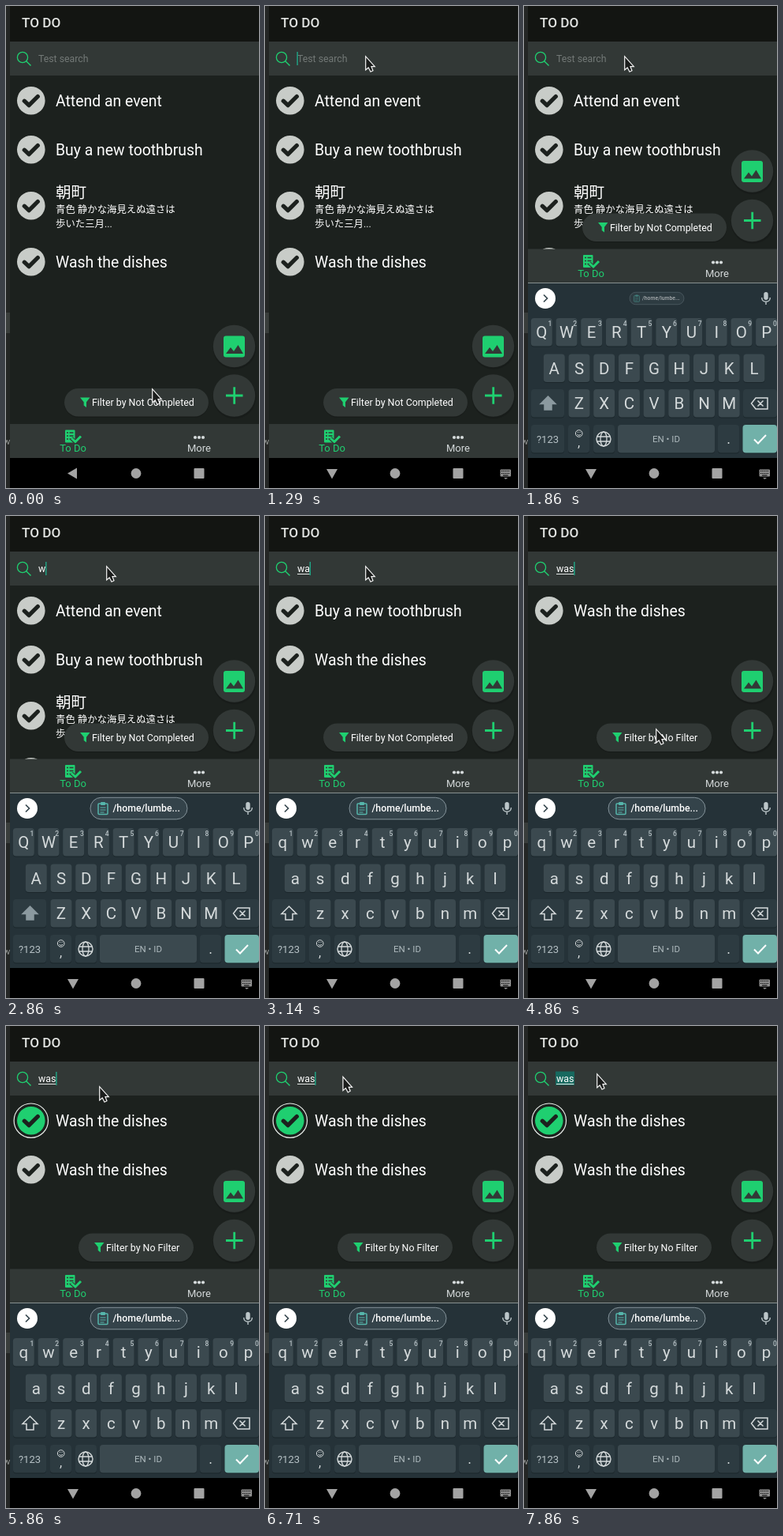
An HTML page for the animation above (8 s loop, 321 px wide and 610 px high).

```html
<!DOCTYPE html>
<html lang="en">
<head>
<meta charset="utf-8">
<style>
  html, body { margin: 0; height: 100%; overflow: hidden; background: #000; }
  svg { display: block; width: 100vw; height: 100vh; font-family: Roboto, "Noto Sans CJK JP", "Noto Sans CJK", sans-serif; }
  text { white-space: pre; }
</style>
</head>
<body>
<svg id="stage" viewBox="0 0 321 610"></svg>
<script>
const LOOP = 8000, FPS = 7;
const GREEN = '#1fcf70', PANEL = '#323836', BODY = '#1c211e', SOFT = '#d5dadb';
const stage = document.getElementById('stage');

const rect = (x, y, w, h, fill, rx = 0, more = '') =>
  `<rect x="${x}" y="${y}" width="${w}" height="${h}" rx="${rx}" fill="${fill}" ${more}/>`;
const circle = (x, y, r, fill, more = '') => `<circle cx="${x}" cy="${y}" r="${r}" fill="${fill}" ${more}/>`;
const text = (x, y, size, str, fill = '#fff', more = '') =>
  `<text x="${x}" y="${y}" font-size="${size}" fill="${fill}" ${more}>${str}</text>`;
const centered = (x, y, size, str, fill = SOFT, more = '') => text(x, y, size, str, fill, `text-anchor="middle" ${more}`);
const fillPath = (d, fill) => `<path d="${d}" fill="${fill}"/>`;
const line = (d, color, width = 1.5, more = '') =>
  `<path d="${d}" fill="none" stroke="${color}" stroke-width="${width}" ${more}/>`;
const group = (x, y, inner, more = '') => `<g transform="translate(${x} ${y}) ${more}">${inner}</g>`;

const wash = { title: 'Wash the dishes' };
const tasks = [
  { title: 'Attend an event' },
  { title: 'Buy a new toothbrush' },
  { title: '朝町', note: ['青色 静かな海見えぬ遠さは', '歩いた三月...'] },
  wash
];

// Pointer stops: step, x, y
const stops = [[1, 185, 484], [6, 127, 63], [27, 127, 63], [28, 167, 269],
  [36, 167, 269], [41, 118, 76], [43, 116, 74], [49, 92, 60]];

function pointerAt(n) {
  const i = stops.findIndex(s => s[0] >= n);
  if (i < 0) return stops.at(-1).slice(1);
  if (i === 0) return stops[0].slice(1);
  const [a, b] = [stops[i - 1], stops[i]];
  const u = (n - a[0]) / (b[0] - a[0]), k = u * u * (3 - 2 * u);
  return [a[1] + (b[1] - a[1]) * k, a[2] + (b[2] - a[2]) * k];
}

const typedAt = n => 'was'.slice(0, Math.max(0, Math.min(3, Math.floor((n - 17) / 2))));

function taskRow(task, y) {
  const badge = circle(0, 0, 17.8, task.done ? GREEN : '#c8ccc8') +
    line('M-8.5 .5L-2.7 6L8.5 -5.2', BODY, 5.3, 'stroke-linecap="round" stroke-linejoin="round"') +
    (task.done ? circle(0, 0, 21.7, 'none', 'stroke="#e8ece9" stroke-width="1.2"') : '');
  const label = task.note
    ? text(63, y - 10, 19.6, task.title) + task.note.map((s, i) => text(63, y + 8.5 + 18 * i, 12.4, s)).join('')
    : text(63, y + 7, 19.4, task.title);
  return group(31.8, y - .3, badge) + label;
}

function taskList(n) {
  const query = typedAt(n - 2);
  const shown = n >= 36 ? [{ ...wash, done: true }, wash]
    : tasks.filter(t => t.title.toLowerCase().includes(query));
  let y = 89;
  return shown.map(task => {
    const half = task.note ? 40 : 31;
    y += 2 * half;
    return taskRow(task, y - half);
  }).join('');
}

function searchBar(n) {
  const typed = typedAt(n), width = [0, 9.7, 16.2, 22.8][typed.length];
  const selected = n >= 52;
  const caret = n < 9 ? n === 8 : n < 19 ? n < 13 || n > 16
    : !selected && Math.floor((n - 25) / 3.5) % 2 !== 1;
  return rect(5, 45, 316, 43, PANEL) +
    circle(21, 65, 6.6, 'none', `stroke="${GREEN}" stroke-width="1.3"`) + line('M25.7 69.7L31.5 75.5', GREEN, 1.4) +
    (selected ? rect(40, 57.5, 24, 17.5, '#17695f') : '') +
    (typed ? text(41, 71, 12.4, typed) : text(41, 71, 12.3, 'Test search', '#737977')) +
    (n >= 21 ? rect(41, 73, width - .5, 1, '#e4e8e6') : '') +
    (caret ? rect(40.4 + width, 58, 1.4, 17, '#20a888') : '');
}

function floating(n) {
  const [label, x, w] = n < 31 ? ['Filter by Not Completed', 74, 183] : ['Filter by No Filter', 92, 146];
  const disc = y => circle(290, y + 2, 27.5, '#000', 'opacity=".14"') + circle(289.5, y, 26.7, PANEL);
  return disc(430.5) + rect(276, 417.5, 27, 27, GREEN, 3) + fillPath('M279 440L285 432L289 437L294.5 429L301 440Z', PANEL) +
    disc(493) + line('M279 493H300.5M289.7 482.3V503.7', GREEN, 2.8) +
    rect(x, 486, w, 35, '#000', 17.5, 'opacity=".14"') + rect(x, 484, w, 35.5, PANEL, 17.7) +
    group(x + 20, 495.5, fillPath('M0 0H12.5L8 5.7V12.5L4.7 10V5.7Z', GREEN)) +
    text(x + 35, 506, 12.4, label);
}

function tabBar() {
  return rect(5, 529, 316, 43, PANEL) +
    rect(75, 536.5, 12.5, 16, GREEN, 1) +
    line('M77 540H79M77 544H79M77 548H79M80.5 540H85.5M80.5 544H85.5M80.5 548H84', PANEL, 1.3) +
    line('M83 547L88 552L95 544.5', PANEL, 5) + line('M83 547L88 551.5L95 544.5', GREEN, 3) +
    centered(85, 564, 13, 'To Do', GREEN) +
    [240, 245, 250].map(x => circle(x, 546, 2.1, SOFT)).join('') + centered(245, 564, 13, 'More');
}

function chip(n) {
  const u = Math.min(1, (n - 13) / 3), scale = .56 + .44 * u;
  return `<g transform="translate(168.5 370) scale(${scale})" opacity="${.6 + .4 * u}">` +
    rect(-61.5, -13.7, 123, 27.5, '#34434a', 13.7, 'stroke="#84939a"') +
    rect(-51.5, -6, 12, 13.5, 'none', 1, 'stroke="#55b5ab" stroke-width="1.5"') + rect(-48.5, -8, 6, 4, '#55b5ab', 1) +
    line('M-49 -1H-42M-49 2H-42M-49 5H-44', '#55b5ab', 1) +
    text(-33, 4.3, 12.3, '/home/lumbe...', '#fff', 'font-weight="500"') + '</g>';
}

function keyboard(n) {
  const KEY = '#3b494f', DIM = '#2d3b41', PITCH = 31.7;
  const upper = n < 21;
  const key = (x, y, w, fill = KEY) => rect(x, y + 1, w, 35.5, '#1b262b', 4) + rect(x, y, w, 35.5, fill, 4);
  const letters = (row, x, y) => [...row].map((c, i) => {
    const cx = x + i * PITCH;
    return key(cx - 13.5, y, 27) + centered(cx, y + 25, 20.5, upper ? c.toUpperCase() : c);
  }).join('');
  const digits = [...'1234567890'].map((d, i) => centered(33 + i * PITCH, 405, 8.5, d, '#b8c2c6', 'font-weight="500"')).join('');
  return rect(5, 350, 316, 222, '#253238') + rect(5, 350, 316, 1, '#87908f') +
    circle(27, 370, 13, '#fff') + line('M25 365.5L29.5 370L25 374.5', '#37474f', 1.7) + chip(n) +
    rect(304.3, 362, 5.4, 10, '#bcc6c9', 2.7) + line('M301.7 369C301.7 376 312.3 376 312.3 369M307 374V378', '#bcc6c9', 1.4) +
    letters('qwertyuiop', 22.3, 395) + digits + letters('asdfghjkl', 38.3, 440.5) +
    key(9, 485, 42, DIM) + letters('zxcvbnm', 70, 485) + key(278, 485, 43, DIM) +
    `<path d="M30.5 494L40 503.5H35V511H26V503.5H21Z" fill="${upper ? '#8b999f' : 'none'}" stroke="${upper ? '#8b999f' : SOFT}" stroke-width="1.5"/>` +
    line('M294 496H309V510H294L288.5 503ZM296.5 499.5L303.5 506.5M303.5 499.5L296.5 506.5', SOFT) +
    key(9, 530, 42, DIM) + centered(30, 553, 13, '?123', '#b8c3c7') +
    key(56, 530, 27, DIM) + circle(69.7, 541, 4.3, 'none', `stroke="${SOFT}"`) +
    line('M67.5 542.3Q69.7 544.7 72 542.3M68 539.4H69M70.5 539.4H71.5', SOFT, 1) + centered(69.7, 558, 16, ',') +
    key(88, 530, 27, DIM) + circle(101, 548, 9, 'none', `stroke="${SOFT}" stroke-width="1.4"`) +
    `<ellipse cx="101" cy="548" rx="4" ry="9" fill="none" stroke="${SOFT}" stroke-width="1.3"/>` +
    line('M92.7 545H109.3M92.7 551H109.3', SOFT, 1.3) +
    key(119, 530, 123) + centered(180.5, 552, 11.5, 'EN • ID', '#aeb9bd') +
    key(246, 530, 27, DIM) + centered(259.5, 554, 18, '.') +
    key(277.5, 530, 43.5, '#71b1a9') + line('M292 548.5L297 553.5L307 543', '#fff', 2);
}

function navBar(n) {
  const gray = '#a3a3a3', typing = n >= 9;
  const dots = [588, 591].map(y => line(`M300 ${y + .5}H311`, '#000', 1.2, 'stroke-dasharray="1.2 1"')).join('');
  return rect(5, 572, 316, 38, '#000') +
    fillPath(typing ? 'M78 586H92L85 598.5Z' : 'M78 591.5L90 584.5V598.5Z', gray) +
    circle(165, 591.5, 6.4, gray) + rect(238.5, 585, 13, 13, gray, 1) +
    (typing ? rect(298.5, 586.5, 13.5, 9, '#8e8e8e', 1) + dots + line('M302 594H308.5', '#000', 1) +
      fillPath('M303 597H308L305.5 599Z', '#8e8e8e') : '');
}

function render(n) {
  const open = n >= 13;
  const [px, py] = pointerAt(n);
  const lift = open ? -221.5 : 0;
  stage.innerHTML =
    rect(0, 0, 321, 610, BODY) + rect(0, 0, 5, 610, '#242625') + rect(0, 388, 5, 26, '#393d3b') +
    text(-3, 555, 11, 'w', '#9a9d9b') + rect(5, 88, 316, 484, BODY) +
    rect(5, 0, 316, 45, '#131512') + text(20, 27, 17.2, 'TO DO', '#e2e4e2', 'font-weight="500"') +
    searchBar(n) + taskList(n) + group(0, lift, floating(n) + tabBar()) +
    (open ? keyboard(n) : '') + navBar(n) +
    group(px, py, '<path d="M.7 .7V18L4.2 15L7 20.3L10 18.7L8 13.7H12.3Z" fill="#1b1d1c" stroke="#f4f4f4" stroke-width="1.2"/>');
}

let last = -1;
function tick(now) {
  // The screen advances in whole steps, seven per second
  const n = Math.floor((now % LOOP + 5) * FPS / 1000) % (LOOP * FPS / 1000);
  if (n !== last) render(last = n);
  requestAnimationFrame(tick);
}
render(0);
requestAnimationFrame(tick);
</script>
</body>
</html>
```
